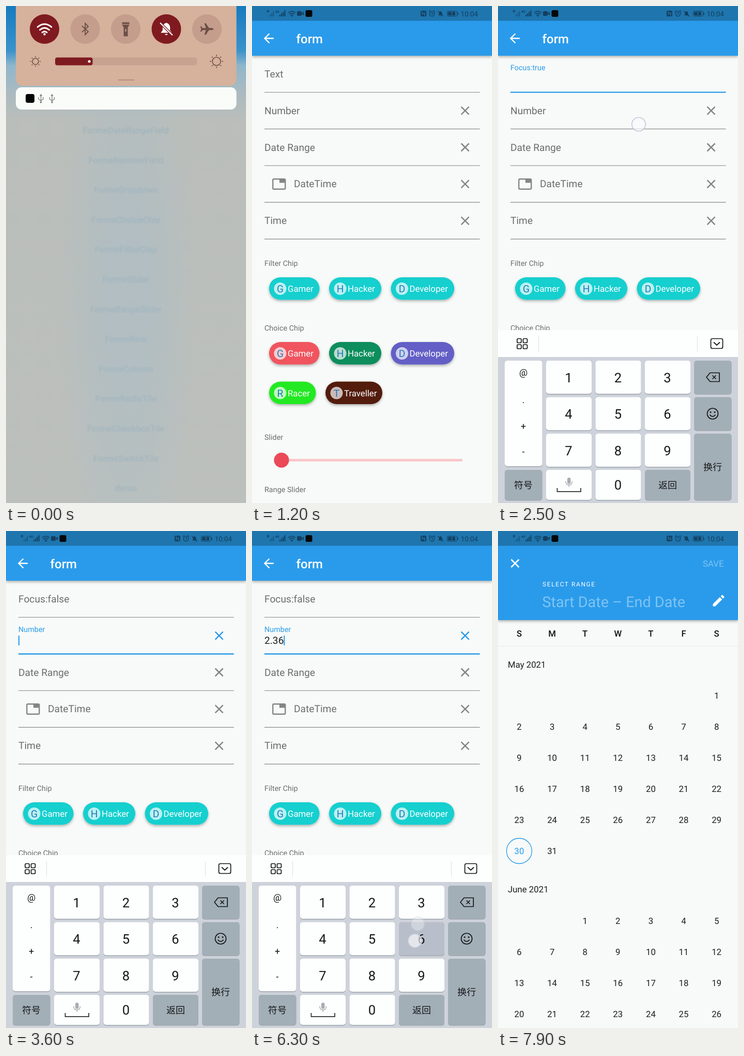
An HTML page that plays this animation: 464 px wide and 960 px high, repeating every 8000 ms.

```html
<!DOCTYPE html>
<html lang="en">
<head>
<meta charset="utf-8">
<title>Forme</title>
<style>
html, body { margin: 0; width: 100%; height: 100%; overflow: hidden; background: #f7faf8; }
svg { display: block; width: 464px; height: 960px; font-family: Roboto, sans-serif; text-rendering: geometricPrecision; }
.cjk { font-family: "Noto Sans CJK SC", "Noto Sans CJK", sans-serif; }
#pressed { mix-blend-mode: multiply; }
</style>
</head>
<body>
<svg id="stage" viewBox="0 0 464 960"></svg>
<script>
const BLUE = '#2a9beb', GREY = '#6c6e6d', ICON = '#848685', BG = '#f7faf8', INK = '#1d1f1e';
const LOOP = 8000, STEP = 100;

// Drawing helpers
const text = (x, y, s, size, fill, extra = '') =>
  `<text x="${x}" y="${y}" font-size="${size}" fill="${fill}" ${extra}>${s}</text>`;
const mid = (x, y, s, size, fill, extra = '') =>
  text(x, y, s, size, fill, 'text-anchor="middle" ' + extra);
const rect = (x, y, w, h, fill, r = 0, extra = '') =>
  `<rect x="${x}" y="${y}" width="${w}" height="${h}" rx="${r}" fill="${fill}" ${extra}/>`;
const circle = (x, y, r, fill, extra = '') =>
  `<circle cx="${x}" cy="${y}" r="${r}" fill="${fill}" ${extra}/>`;
const line = (d, color, w = 2, extra = '') =>
  `<path d="${d}" fill="none" stroke="${color}" stroke-width="${w}" ${extra}/>`;
const fill = (d, color) => `<path d="${d}" fill="${color}"/>`;
const group = (id, body) => `<g id="${id}">${body}</g>`;
const at = (x, y, body, s = 1) => `<g transform="translate(${x} ${y}) scale(${s})">${body}</g>`;
const bold = 'font-weight="500"';
const round = 'stroke-linecap="round" stroke-linejoin="round"';
const cross = (x, y, r, color) =>
  line(`M${x - r} ${y - r}l${2 * r} ${2 * r}m0 ${-2 * r}l${-2 * r} ${2 * r}`, color, 2.5);
const wifi = color =>
  line('M-12-4Q0-14 12-4M-8 1Q0-6 8 1M-4 5.5Q0 2 4 5.5', color, 2.6, round) + circle(0, 8.5, 2, color);
const bell = color =>
  fill('M-9 6L-6 2V-3Q-5-9 0-10Q5-9 6-3V2L9 6ZM-2.5 8H2.5Q0 12-2.5 8Z', color);

function statusBar() {
  const c = '#123f5f';
  const bars = (x, n, h) => Array.from({length: n}, (_, i) =>
    rect(x + i * 3.2, 20 - (i + 1) * h, 2, (i + 1) * h, c)).join('');
  return rect(0, 0, 464, 28.5, '#1f75ad') +
    `<g opacity=".5">${bars(34, 3, 3.2)}</g>` + line('M29 8l4 4m0-4l-4 4', c, 1.2) +
    text(45, 13, '4G', 6, c, 'font-weight="700"') + bars(53, 4, 2.9) +
    at(77, 15, wifi(c), .56) +
    rect(87, 10, 9, 9, c, 2) + fill('M96 14l4-3v7l-4-3Z', c) +
    rect(103.5, 8, 13, 13, '#05080a', 3) +
    rect(326, 9, 11, 11, c, 2) + line('M329 18v-7l5 7v-7', '#1f75ad', 1.3) +
    circle(348, 15, 4.6, 'none', `stroke="${c}" stroke-width="1.4"`) +
    line('M348 12v3l2 1M342 11l3-2.5M351 8.5l3 2.5', c, 1.3) +
    at(364.5, 15, bell(c) + line('M-10-10L10 10', c, 2.5), .5) +
    rect(377.5, 10, 19, 9.5, 'none', 2, `stroke="${c}"`) + rect(379, 11.5, 14, 6.5, c, 1) +
    rect(397.5, 13, 1.5, 4, c) + line('M387 11.5l-2 3h3l-2 3', '#1f75ad', 1) +
    text(403.5, 19.5, '10:04', 13.4, c);
}

const header = (h, body) => rect(0, 28, 464, h - 28, BLUE, 0, 'filter="url(#drop)"') + body;
const backArrow = line('M42 62.5H25.5M33.5 53.5l-9 9l9 9', '#fff', 2.4);

function listPage() {
  const names = ['Time', 'DateTime', 'DateRange', 'Number'].map(n => `Forme${n}Field`).concat(
    ['Dropdown', 'ChoiceChip', 'FilterChip', 'Slider', 'RangeSlider', 'Row', 'Column',
     'RadioTile', 'CheckboxTile', 'SwitchTile'].map(n => 'Forme' + n), 'demo');
  return rect(0, 0, 464, 960, BG) +
    header(96, text(19, 71.5, 'Forme', 24, '#fff', bold)) +
    names.map((n, i) => mid(231.8, 130.7 + i * 57.6, n, 16.8, BLUE, bold)).join('');
}

function chip(x, y, w, name, color) {
  return rect(x, y - 22, w, 43.5, color, 21.8, 'filter="url(#drop)"') +
    circle(x + 21.5, y, 12, '#fff', 'opacity=".7"') +
    mid(x + 21.5, y + 7, name[0], 19.2, '#2378bd') +
    text(x + 36, y + 6, name, 16.8, '#fff');
}

function formPage() {
  const label = (y, s) => text(24, y, s, 14.4, GREY);
  const rows = [0, 1, 2, 3, 4].map(i => {
    const y = 166.6 + i * 70.9;
    return `<path id="rule${i}" d="M24 ${y}H440.5" stroke="#9a9c9b" stroke-width="1.4"/>` +
      (i ? group('clear' + i, cross(412, y - 35.4, 7.5, 'currentColor')) : '');
  }).join('');
  const cyan = '#12cfcf';
  return rect(0, 0, 464, 960, BG) +
    header(96, backArrow + text(85.5, 71.5, 'form', 24, '#fff', bold)) +
    `<g color="${ICON}">${rows}</g>` +
    `<text id="label0" font-size="19.2"></text><text id="label1" font-size="19.2">Number</text>` +
    text(24, 279.5, 'Date Range', 19.2, GREY) + text(81, 350.4, 'DateTime', 19.2, GREY) +
    text(24, 421.3, 'Time', 19.2, GREY) +
    rect(40.3, 334.3, 24, 19.5, 'none', 2, `stroke="${ICON}" stroke-width="2.4"`) +
    rect(53, 334, 12, 7.5, ICON) +
    `<text id="value" x="24" y="218" font-size="19.2" fill="${INK}"></text>` +
    rect(24, 202, 2, 19, BLUE, 0, 'id="caret"') +
    label(502, 'Filter Chip') +
    chip(33, 546, 97.5, 'Gamer', cyan) + chip(149, 546, 101, 'Hacker', cyan) +
    chip(268.5, 546, 122.5, 'Developer', cyan) +
    label(627, 'Choice Chip') +
    chip(33, 671, 97.5, 'Gamer', '#f0545f') + chip(149, 671, 101, 'Hacker', '#0c8e5b') +
    chip(268.5, 671, 122.5, 'Developer', '#645ec6') +
    chip(33, 747.5, 90.5, 'Racer', '#24e924') + chip(142, 747.5, 110, 'Traveller', '#521a08') +
    label(838, 'Slider') + rect(57, 874.7, 350, 5, '#f9c6ca', 2.5) +
    circle(57, 877.3, 14.5, '#eb4958') + label(939, 'Range Slider');
}

const COLS = [93, 188.5, 284], ROWS = [685, 755.5, 826];

function keyboard() {
  const dark = '#a3afb7', ink = '#141618';
  const key = (x, y, w, h, c = '#fdfefe') => rect(x, y + 1.5, w, h, '#9fa6ae', 5) + rect(x, y, w, h, c, 5);
  const han = (x, y, s) => mid(x, y, s, 18, ink, 'class="cjk"');
  let out = rect(0, 626, 464, 334, '#ced2da') + rect(0, 626, 464, 52, '#fdfefe');
  for (const x of [37, 48.5])
    for (const y of [642.5, 654])
      out += rect(x, y, 8, 8, 'none', 2, `stroke="${ink}" stroke-width="1.7"`);
  out += line('M78.5 638v29M385.5 638v29', '#dddfe1', 1) +
    rect(411.5, 642.5, 23, 19, 'none', 3, `stroke="${ink}" stroke-width="1.7"`) +
    line('M417 649.5l6 5.5l6-5.5', ink, 1.8);
  out += key(13, 685, 72.5, 204) + key(13, 896, 72.5, 58, dark) + key(93, 896, 88, 58) +
    key(188.5, 896, 88, 58) + key(284, 896, 88, 58, dark) +
    key(379, 685, 72.5, 64, dark) + key(379, 755.5, 72.5, 64, dark) + key(379, 826, 72.5, 128, dark);
  ['@', '.', '+', '-'].forEach((s, i) => out += mid(49, [714, 767, 818, 867][i], s, 18, ink));
  for (let i = 0; i < 9; i++) {
    const x = COLS[i % 3], y = ROWS[i / 3 | 0];
    out += key(x, y, 88, 64) + mid(x + 43.5, y + 41.5, i + 1, 25.5, ink);
  }
  out += mid(232, 934, '0', 25.5, ink) + han(49, 932, '符号') + han(328, 932, '返回') + han(415, 897, '换行');
  out += line('M114.5 931v7h45.5v-7', '#44484b', 2) + rect(134, 911, 6.5, 12, '#a9adb1', 3.2) +
    line('M131 918q0 7 6.2 7t6.2-7M137.2 925v4', '#a9adb1', 1.5);
  out += line('M403 717l7-8.5h18v17h-18Z', ink, 1.7, round) + line('M414.5 713.5l7 7m0-7l-7 7', ink, 1.6) +
    circle(415, 787.5, 10.5, 'none', `stroke="${ink}" stroke-width="1.7"`) +
    circle(411, 784.5, 1.5, ink) + circle(419, 784.5, 1.5, ink) + line('M409.5 789.5q5.5 7 11 0', ink, 1.6);
  return out + rect(0, 0, 88, 64, '#bbc0cb', 5, 'id="pressed"');
}

function picker() {
  const col = i => 41 + i * 63.6;
  const month = (name, y, first, days) => text(19, y, name, 16.8, INK) +
    Array.from({length: days}, (_, d) => {
      const cell = first + d, today = first === 6 && d === 29;
      return mid(col(cell % 7), y + 60.3 + 60 * (cell / 7 | 0), d + 1, 16.8, today ? BLUE : INK);
    }).join('');
  return rect(0, 0, 464, 960, BG) +
    header(172, cross(33, 62.5, 7.5, '#fff') + text(396, 68.5, 'SAVE', 16.8, '#fff', 'opacity=".4"') +
      text(86, 107, 'SELECT RANGE', 12, '#fff', 'letter-spacing="1.6"') +
      text(85.5, 146.5, 'Start Date – End Date', 28.8, '#fff', 'opacity=".4"') +
      fill('M415.5 141v4.5h4.5l13.3-13.3l-4.5-4.5ZM430.5 126l4.5 4.5l2-2q1-1 0-2l-2.5-2.5q-1-1-2 0Z', '#fff')) +
    [...'SMTWTFS'].map((s, i) => mid(col(i), 204, s, 16.8, '#111', bold)).join('') +
    line('M0 222.5H464', '#e7eae8', 1) +
    month('May 2021', 264, 6, 31) + month('June 2021', 698.4, 2, 30) +
    circle(41, 618, 24.5, 'none', `stroke="${BLUE}" stroke-width="1.3"`);
}

function shade() {
  const red = '#7f1a20', off = '#c49d8c', ink = '#6d5048';
  const icons = [
    at(0, .5, wifi('#fff'), 1.12),
    line('M-6-6L6 5L0 11V-11L6-5L-6 6', ink, 1.8),
    fill('M-7-13H7V-8L4-3V14H-4V-3L-7-8Z', ink) + line('M-7-9H7', off, 1.2) + rect(-1.2, 0, 2.4, 5, off, 1),
    at(0, 0, bell('#fff') + line('M-10-10L10 10', red, 4) + line('M-10-10L10 10', '#fff', 1.8), 1.2),
    fill('M13 0Q12-2 9-2H4L-2-11H-5L-2-2H-8L-11-5H-13L-11 0L-13 5H-11L-8 2H-2L-5 11H-2L4 2H9Q12 2 13 0Z', ink),
  ];
  const sun = (x, r) => circle(x, 107, r, 'none', `stroke="${ink}" stroke-width="1.6"`) +
    Array.from({length: 8}, (_, i) => `<path d="M0 ${r + 2.3}v${r * .3}" stroke="${ink}" stroke-width="1.7" transform="translate(${x} 107) rotate(${i * 45})"/>`).join('');
  const usb = x => at(x, 179, line('M0 8V-7M-4.5-3V1L0 4L4.5 1V-3M-2-5L0-8L2-5', '#777b79', 1.3) + circle(0, 7, 1.7, '#777b79'));
  return rect(19, -20, 426.5, 174, '#d6b19b', 13) +
    icons.map((icon, i) => at(74.5 + i * 78.5, 44.5,
      circle(0, 0, 28.5, i % 3 ? off : red) + icon)).join('') +
    sun(57, 6) + sun(407, 8) + rect(95, 99.5, 274, 15, '#c7a291', 4) +
    rect(95, 99.5, 72.5, 15, red, 4) + circle(161, 107, 2.6, '#fff') +
    rect(217, 142, 31, 1.6, '#a98676') +
    rect(19, 157, 426.5, 43, '#f9fcf9', 11) + rect(38, 170, 17, 17, '#030504', 4) + usb(67.5) + usb(89);
}

// start, end, x, y, strength
const touches = [
  [700, 850, 240, 933, 1], [1700, 1800, 268, 141, 1], [2400, 2600, 272, 228.5, 1],
  [4200, 4400, 236, 722, 1], [4900, 5100, 52, 765, 1], [5600, 5800, 326, 722, 1],
  [6200, 6400, 315, 791.5, 1], [6300, 6400, 320.5, 759, .5], [7000, 7200, 270, 276, 1]];
// time, text after the key, key box
const keys = [
  [4300, '2', COLS[1], ROWS[0], 88, 64], [5000, '2.', 13, 741, 72.5, 50],
  [5600, '2.3', COLS[2], ROWS[0], 88, 64], [6200, '2.36', COLS[2], ROWS[1], 88, 64]];

const stops = [[0, '#167bbf', 1], [.09, '#3a92cb', 1], [.12, '#8fb6cb', 1], [.17, '#a9bac1', 1], [.23, '#b2b6b2', .88], [1, '#b4b8b4', .88]];
document.getElementById('stage').innerHTML =
  `<defs><filter id="drop" x="-20%" y="-20%" width="140%" height="170%"><feDropShadow dx="0" dy="2.5" stdDeviation="2.5" flood-opacity=".3"/></filter>
  <linearGradient id="haze" x2="0" y2="1">${stops.map(([o, c, a]) => `<stop offset="${o}" stop-color="${c}" stop-opacity="${a}"/>`).join('')}</linearGradient>
  <radialGradient id="tint"><stop offset=".3" stop-color="#9dbbcf" stop-opacity=".3"/><stop offset="1" stop-color="#9dbbcf" stop-opacity="0"/></radialGradient></defs>` +
  group('list', listPage()) + group('form', formPage()) + group('keyboard', keyboard()) +
  group('picker', picker()) + group('status', statusBar()) +
  group('veil', rect(0, 0, 464, 960, 'url(#haze)') + '<ellipse cx="235" cy="570" rx="140" ry="600" fill="url(#tint)"/>') +
  group('shade', shade()) +
  touches.map(([, , x, y], i) => circle(x, y, 13.2, '#fafbfd', `id="touch${i}" fill-opacity=".65" stroke="#c3c9d8" stroke-width="1.6"`)).join('');

const $ = id => document.getElementById(id);
const set = (id, attrs) => { for (const k in attrs) $(id).setAttribute(k, attrs[k]); };
const show = (id, on) => set(id, {visibility: on ? 'visible' : 'hidden'});
const ramp = (t, a, b) => Math.min(1, Math.max(0, (t - a) / (b - a)));
const ease = p => p * p * (3 - 2 * p);
const easeOut = p => 1 - (1 - p) ** 3;
const width = s => [...s].reduce((w, c) => w + (c === '.' ? 5.05 : 10.78), 0);

function field(i, focused, lift) {
  const y = 138 + i * 70.9 - 14 * lift, s = 1 - .25 * lift;
  set('label' + i, {transform: `translate(24 ${y}) scale(${s})`, fill: focused ? BLUE : GREY});
  set('rule' + i, {stroke: focused ? BLUE : '#9a9c9b', 'stroke-width': focused ? 2.4 : 1.4});
}

function draw(t) {
  const closing = ease(ramp(t, 0, 600));
  set('shade', {transform: `translate(0 ${-215 * closing})`});
  set('veil', {opacity: 1 - closing});
  $('list').style.filter = closing < 1 ? `blur(${1.2 * (1 - closing)}px)` : 'none';
  show('status', t >= 100);

  const enter = ramp(t, 850, 1150);
  set('form', {opacity: ease(enter), transform: `translate(0 ${240 * (1 - easeOut(enter))})`});

  const textFocus = t >= 1800 && t < 2600, numFocus = t >= 2600 && t < 7200;
  $('label0').textContent = t < 1800 ? 'Text' : 'Focus:' + textFocus;
  field(0, textFocus, ease(ramp(t, 1800, 2000)) - ease(ramp(t, 2600, 2800)));
  field(1, numFocus, ease(ramp(t, 2600, 2800)));
  set('clear1', {color: numFocus ? BLUE : ICON});

  const last = keys.filter(k => t >= k[0]).pop();
  const value = last ? last[1] : '';
  $('value').textContent = value;
  const since = last ? last[0] : numFocus ? 2600 : 1800;
  set('caret', {x: 24 + width(value), y: textFocus ? 131 : 202});
  show('caret', (textFocus || numFocus) && (t - since) % 1000 < 500);

  const up = easeOut(ramp(t, 1800, 2100)) - ease(ramp(t, 7200, 7500));
  set('keyboard', {transform: `translate(0 ${336 * (1 - up)})`});
  const pressed = last && t < last[0] + 200;
  show('pressed', pressed);
  if (pressed) set('pressed', {x: last[2], y: last[3], width: last[4], height: last[5]});

  set('picker', {opacity: easeOut(ramp(t, 7300, 7600))});
  touches.forEach(([a, b, , , k], i) =>
    set('touch' + i, {opacity: t < a ? 0 : k * (1 - ramp(t, b, b + 150))}));
}

const start = performance.now();
function tick() {
  const t = (performance.now() - start) % LOOP;
  draw(Math.floor(t / STEP) * STEP);
  requestAnimationFrame(tick);
}
tick();
</script>
</body>
</html>
```
